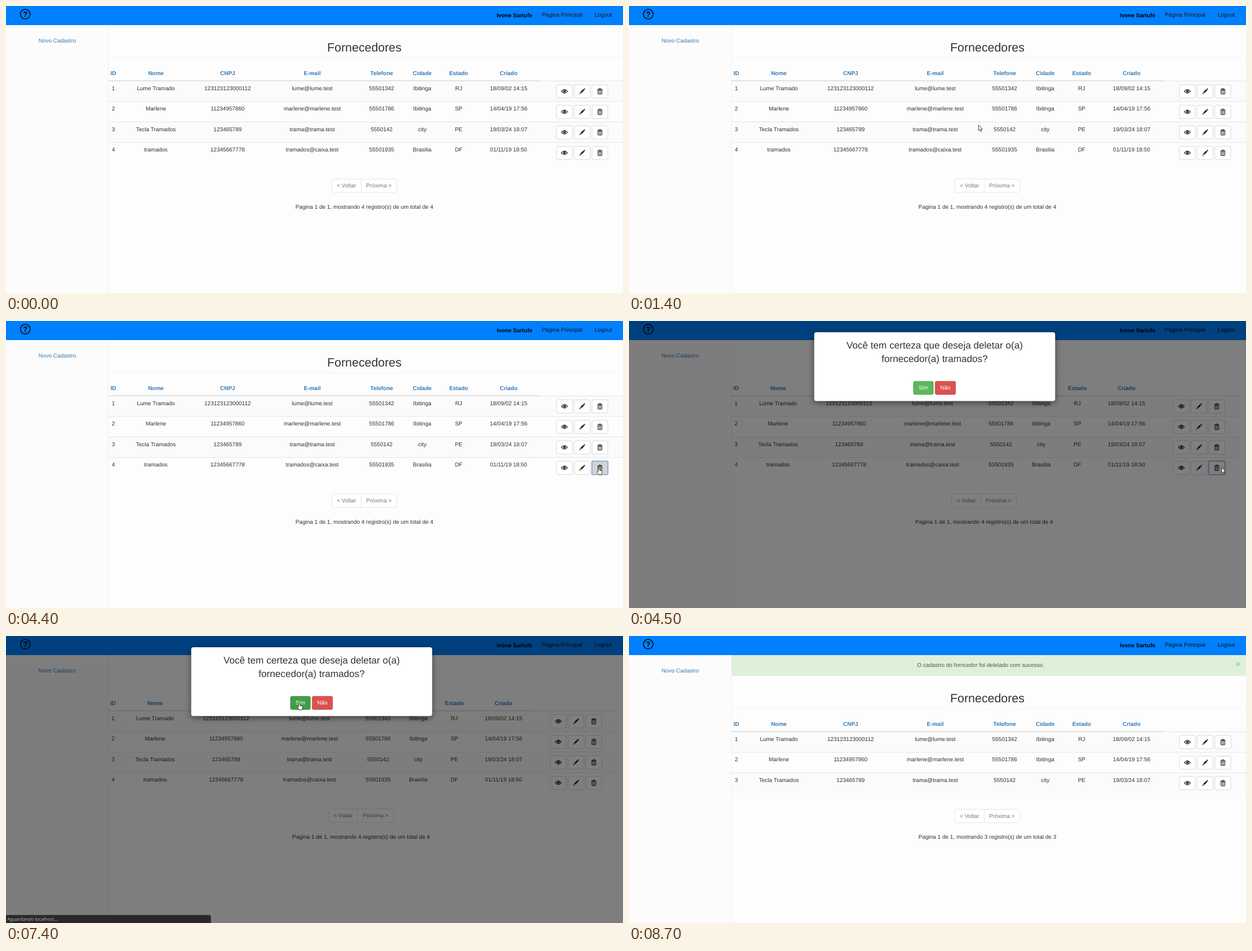
Animation of 1095x511 px, one loop 9.7 s. Source, as an HTML page:

```html
<!DOCTYPE html>
<html lang="pt-BR">
<head>
<meta charset="utf-8">
<title>Fornecedores</title>
<style>
html, body { margin: 0; width: 100%; height: 100%; overflow: hidden; background: #fdfdfd; }
svg { display: block; width: 100%; height: 100%; font: 9.98px "Liberation Sans", Arial, sans-serif; text-rendering: geometricPrecision; }
.status { font: 8.1px "Open Sans", "Noto Sans", sans-serif; }
</style>
</head>
<body>
<svg id="stage" viewBox="0 0 1095 511"></svg>
<script>
const LOOP = 9700, STEP = 100, ROW = 36.5;
const stage = document.getElementById('stage');

const heads = ['ID', 'Nome', 'CNPJ', 'E-mail', 'Telefone', 'Cidade', 'Estado', 'Criado'];
const suppliers = [
  ['1', 'Lume Tramado', '123123123000112', 'lume@lume.test', '55501342', 'Ibitinga', 'RJ', '18/09/02 14:15'],
  ['2', 'Marlene', '11234957860', 'marlene@marlene.test', '55501786', 'Ibitinga', 'SP', '14/04/19 17:56'],
  ['3', 'Tecla Tramados', '123465789', 'trama@trama.test', '5550142', 'city', 'PE', '19/03/24 18:07'],
  ['4', 'tramados', '12345667778', 'tramados@caixa.test', '55501935', 'Brasilia', 'DF', '01/11/19 18:50']
];
// Column centres: full width, and narrowed while the dialog is open
const wide = [190.5, 266, 393.3, 543.5, 666.7, 738.7, 803.3, 892];
const narrow = [190, 264.5, 390.5, 538.7, 660.3, 731.7, 795.7, 883];

// Pointer path: time, x, y
const path = [
  [200, 93, 14], [300, 795, 208], [400, 467, 111], [500, 467, 111], [1100, 624, 201],
  [1300, 624, 201], [1400, 620.5, 212], [1600, 626, 248], [1800, 626, 248],
  [2300, 918, 258], [2400, 918, 258], [2800, 1050, 272.5], [2900, 1050, 272.5],
  [3300, 1041, 268], [3700, 1052, 261], [4800, 1052, 261], [5200, 633, 121],
  [5300, 633, 121], [5600, 719, 112], [6000, 600, 103], [6300, 520.5, 119],
  [8500, 520.5, 119], [8600, 355, 73]
];

const icons = [
  `<path d="M-5.3 0Q0-6.6 5.3 0Q0 6.6-5.3 0Z" fill="none" stroke="#222" stroke-width="1.2"/>
   <circle r="2.4" cy="-.3" fill="#222"/><circle r=".7" cx="-.8" cy="-1.1" fill="#fff"/>`,
  `<path d="M-5 5L-4.1 2.1L-2.1 4.1ZM-3.4 1.4L1.9-3.9L3.9-1.9L-1.4 3.4ZM2.5-4.4L3.3-5.2Q4-5.5 4.7-4.7Q5.5-4 5.2-3.3L4.4-2.5Z" fill="#222"/>`,
  `<path d="M-1.6-4V-5H1.6V-4M-4.5-3.6H4.5M-3.6-2.2V4.3Q-3.6 5 -2.9 5H2.9Q3.6 5 3.6 4.3V-2.2ZM-1.3-1.8V4.6M1.3-1.8V4.6" fill="none" stroke="#222" stroke-width="1"/>`
];
const arrow = 'M0 0V9.8L2.2 7.7L3.8 11.5L5.4 10.8L3.8 7.1H6.9Z';
const hand = 'M-1.2 .9Q0-.8 1.2 .9V4.8L5 5.6Q6.2 5.9 6.1 7.2L5.5 10.4L4.9 12.6H-.1L-2.9 8.4Q-3.6 7.2-2.7 6.8Q-2 6.5-1.2 7.5Z';

const text = (x, y, s, fill = '#333', attrs = '') =>
  `<text x="${x}" y="${y}" text-anchor="middle" fill="${fill}" ${attrs}>${s}</text>`;
const rect = (x, y, w, h, fill, attrs = '') =>
  `<rect x="${x}" y="${y}" width="${w}" height="${h}" fill="${fill}" ${attrs}/>`;
const box = (x, y, w, h, fill, line) =>
  rect(x + .35, y + .35, w - .7, h - .7, fill, `rx="2.8" stroke="${line}" stroke-width=".75"`);

function pointerAt(t) {
  if (t < path[0][0] || t >= 8700) return null;
  const i = path.findIndex(k => k[0] >= t);
  const b = path[i], a = path[Math.max(0, i - 1)];
  const f = b[0] > a[0] ? (t - a[0]) / (b[0] - a[0]) : 1;
  return { x: a[1] + (b[1] - a[1]) * f, y: a[2] + (b[2] - a[2]) * f };
}

function draw(t) {
  const modal = t >= 4500 && t < 8000, deleted = t >= 8000;
  const p = pointerAt(t);
  const over = (x, y, w, h) => p && p.x >= x && p.x <= x + w && p.y >= y && p.y <= y + h;
  const off = deleted ? 37 : 0, shift = modal ? -5.8 : 0;
  const cols = modal ? narrow : wide;
  const right = modal ? 1084 : 1095, headEnd = modal ? 938 : 948;
  const rows = deleted ? suppliers.slice(0, 3) : suppliers;
  const top = 133.2 + off;
  let pointing = deleted && t < 8600;

  let s = rect(0, 0, 1095, 511, '#fdfdfd') + rect(0, 33, 182, 478, '#fcfcfc')
    + rect(181.3, 33, .8, 478, '#eee') + rect(0, 0, 1095, 34, '#0080ff');
  s += '<circle cx="34.2" cy="14.7" r="8.6" fill="none" stroke="#000" stroke-width="1.5"/>'
    + text(34.2, 19.2, '?', '#000', 'font-size="13" font-weight="bold"')
    + text(902.5, 19.6, 'Ivone Sartufe', '#000', 'font-weight="bold"')
    + text(987, 18.7, 'Página Principal', '#111')
    + text(1060, 18.7, 'Logout', '#111')
    + text(91, 65.3, 'Novo Cadastro', '#337ab7');

  if (deleted) {
    s += rect(182, 34, 913, 36.8, '#dff0d8')
      + text(624, 55, 'O cadastro do forncedor foi deletado com sucesso.', '#3f5f3f')
      + text(1081, 55.3, '×', '#b2c0ad', 'font-size="15" font-weight="bold"');
  }

  s += text(636 + shift, 81.2 + off, 'Fornecedores', '#333', 'font-size="21.39"')
    + rect(182, 91.7 + off, right - 182, .75, '#eee');
  heads.forEach((h, i) => s += text(cols[i], 122.5 + off, h, '#337ab7', 'font-weight="bold"'));

  rows.forEach((row, r) => {
    const y = top + r * ROW;
    if (r % 2 === 0) s += rect(182, y, right - 182, ROW, '#fbfbfb');
    s += rect(182, y, right - 182, .75, '#ddd');
    row.forEach((v, i) => s += text(cols[i], y + 16.3, v));
    icons.forEach((icon, i) => {
      const x = 976.6 + i * 31.5 + (modal ? -10.8 : 0), by = y + 6.7;
      const hover = !modal && !deleted && over(x, by, 28.8, 24.3);
      const trash = r === 3 && i === 2;
      const pressed = trash && t === 4400;
      const focused = trash && t >= 4400 && t < 6900;
      pointing = pointing || hover;
      s += box(x, by, 28.8, 24.3, pressed ? '#d4d4d4' : hover ? '#e6e6e6' : '#fff', hover ? '#adadad' : '#ccc');
      if (focused) s += rect(x, by, 28.8, 24.3, 'none', 'rx="1.5" stroke="#6b9ee3" stroke-width="1.2"');
      s += `<g transform="translate(${x + 14.4} ${by + 12})">${icon}</g>`;
    });
  });
  s += rect(182, top - .9, headEnd - 182, 1.4, '#ddd');

  const py = top + rows.length * ROW + 28.5;
  s += box(578 + shift, py, 115.7, 24.5, '#fff', '#ddd')
    + rect(629.8 + shift, py, .75, 24.5, '#ddd')
    + text(604.3 + shift, py + 15.3, '&lt; Voltar', '#777')
    + text(661.7 + shift, py + 15.3, 'Próxima &gt;', '#777')
    + text(636 + shift, py + 53, `Pagina 1 de 1, mostrando ${rows.length} registro(s) de um total de ${rows.length}`);

  if (modal) {
    const yes = over(504.5, 107, 36, 24.3), no = over(543, 107, 37, 24.3);
    pointing = yes || no;
    s += rect(0, 0, 1095, 511, '#000', 'opacity=".5"')
      + rect(328.7, 20, 427.6, 122.6, '#fff', 'rx="4" style="filter:drop-shadow(0 3.6px 5.4px rgba(0,0,0,.5))"')
      + text(542.5, 48.8, 'Você tem certeza que deseja deletar o(a)', '#333', 'font-size="17.11"')
      + text(542.5, 72.6, 'fornecedor(a) tramados?', '#333', 'font-size="17.11"')
      + box(504.5, 107, 36, 24.3, t === 6900 ? '#398439' : yes ? '#449d44' : '#5cb85c', yes ? '#398439' : '#4cae4c')
      + text(522.5, 122.3, 'Sim', '#fff')
      + box(543, 107, 37, 24.3, no ? '#c9302c' : '#d9534f', no ? '#ac2925' : '#d43f3a')
      + text(561.5, 122.3, 'Não', '#fff');
  }

  if (t >= 6300 && t < 8400) {
    const label = t < 7400 ? 'localhost/fornecedores/delete/4' : 'Aguardando localhost...';
    s += `<g opacity="${t >= 8300 ? .5 : 1}"><path d="M0 496.8H360.5Q363.6 496.8 363.6 500V511H0Z" fill="#292929"/>`
      + `<text class="status" x="2.6" y="507.4" fill="#bbb">${label}</text></g>`;
  }

  if (p) {
    s += `<path transform="translate(${p.x} ${p.y})" d="${pointing ? hand : arrow}" fill="#fff" stroke="#111" stroke-width=".8" stroke-linejoin="round"/>`;
  }
  stage.innerHTML = s;
}

let last = -1;
function tick() {
  const t = Math.floor(performance.now() % LOOP / STEP) * STEP;
  if (t !== last) draw(last = t);
  requestAnimationFrame(tick);
}
tick();
</script>
</body>
</html>
```
